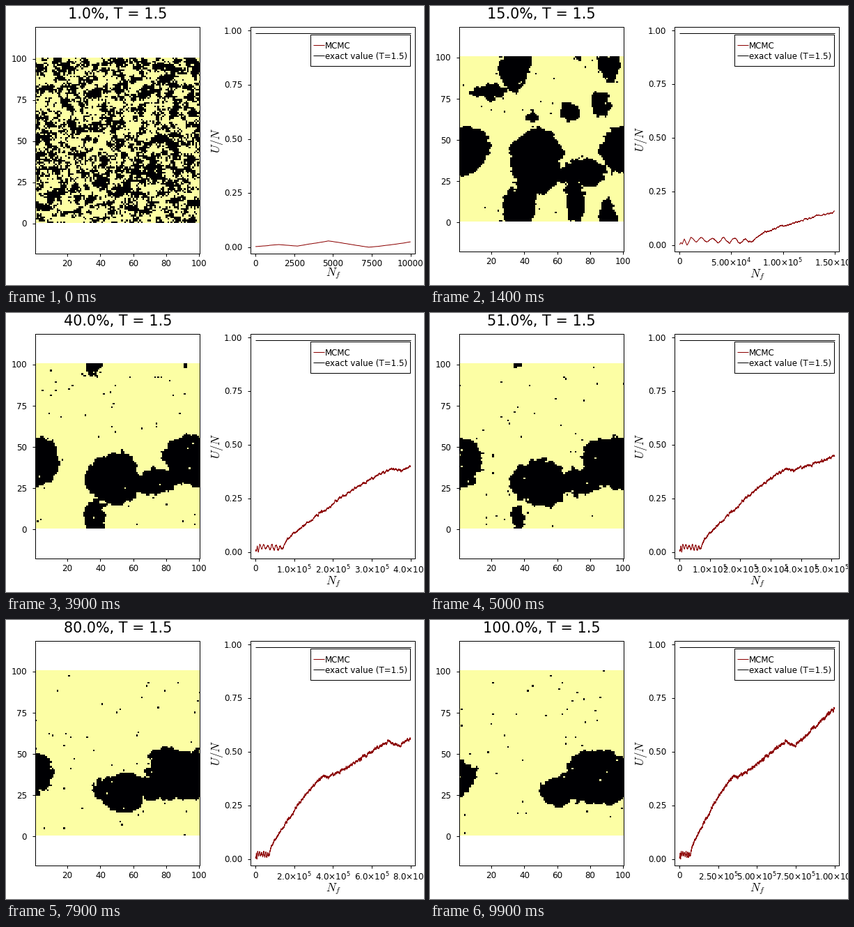
A matplotlib script that plays this animation: 600 px wide and 400 px high, repeating every 10000 ms.

```python
import numpy as np
import matplotlib.pyplot as plt
from matplotlib.animation import FuncAnimation
from matplotlib.patches import Rectangle

W, H, DPI = 600, 400, 100
PX = 72 / DPI
N = 100                 # lattice side
FRAMES = 100
SWEEP = 10_000          # spin updates per frame
FORMED = 15             # percent at which large domains have formed
T = 1.5
EXACT = (1 - np.sinh(2 / T) ** -4) ** 0.125
INK, RED = "black", "#8b0000"
TOP = 30.3
LEFT, RIGHT = (42.1, 278.4), (351.4, 587.4)
SMALL, GUIDE, TITLE = 11.86, 16.8, 20.75

plt.rcParams["font.family"] = "DejaVu Sans"
gy, gx = np.mgrid[0:N, 0:N] + 0.5


# ---------- spin lattice ----------
def smooth_noise(seed, sigma):
    """Periodic Gaussian noise with unit variance."""
    white = np.random.default_rng(seed).normal(size=(N, N))
    k = np.fft.fftfreq(N) * 2 * np.pi
    kernel = np.exp(-0.5 * sigma ** 2 * (k[:, None] ** 2 + k[None, :] ** 2))
    out = np.fft.ifft2(np.fft.fft2(white) * kernel).real
    return out / out.std()


def drifting_noise(seed, sigma, pct, period):
    """Noise that turns smoothly into a fresh pattern every period."""
    k, u = divmod(pct, period)
    a = u / period * np.pi / 2
    return (np.cos(a) * smooth_noise(seed + k, sigma)
            + np.sin(a) * smooth_noise(seed + k + 1, sigma))


def blob(cx, cy, rx, ry):
    """Rough signed distance to an ellipse on the torus, positive inside."""
    dx = (gx - cx + N / 2) % N - N / 2
    dy = (gy - cy + N / 2) % N - N / 2
    return min(rx, ry) * (1 - np.hypot(dx / rx, dy / ry))


# x, y, rx, ry of domains that shrink away, and their lifetime
FADING = [
    (36, 6, 10, 21, .55), (33, 91, 8, 12, .25), (18, 79, 11, 5, .25),
    (70, 10, 6, 14, .25), (91, 98, 7, 13, .3), (85, 71, 6, 8, .12),
    (67, 67, 6, 6, .1), (44, 63, 4, 3, .06),
]


def domains(t):
    """Positive where spins point down; t runs from 0 to 1."""
    def mix(a, b, u):
        return np.array(a) + (np.array(b) - a) * u

    parts = [blob(*mix((46, 38, 17, 19), (47, 26, 18, 14), min(2 * t, 1))
                  + mix((0, 0, 0, 0), (14, 0, -6, -6), t ** 4)),
             blob(*mix((102, 44, 17, 15), (85, 35, 24, 16), t)),
             blob(*mix((75, 30, 15, 8), (74, 27, 15, 8), t))]
    for x, y, rx, ry, life in FADING:
        if t < life:
            s = np.sqrt(1 - t / life)
            parts.append(blob(x, y, rx * s, ry * s))
    return np.max(parts, axis=0)


def spins(pct):
    field = domains(max(0, pct - FORMED) / (FRAMES - FORMED))
    field += 0.8 * drifting_noise(500, 4, pct, 40)
    field += 0.7 * drifting_noise(100, 0.9, pct, 6)
    if pct < FORMED:
        t = (pct - 1) / (FORMED - 1)
        grain = smooth_noise(7, 1.2 + 2.2 * np.sqrt(t))
        grain += 0.8 * (1 - t) ** 6 * smooth_noise(8, 0)
        w = 0.12 + 0.88 * t
        field = w * np.clip(field, -8, 8) + 8 * (1 - w) * grain
    flips = np.random.default_rng(pct).random((N, N)) < 0.0045
    return ((field < 0) ^ flips).astype(float)


# ---------- magnetisation curve ----------
TREND = [(0, .003), (.15, .013), (.27, .005), (.47, .029), (.73, .001),
         (1.1, .026), (7, .016), (8, .06), (15, .157), (25, .293),
         (34.5, .387), (38, .385), (48, .43), (60, .503), (68, .547),
         (75, .53), (85, .60), (100, .705)]


def walk(per=100, memory=30):
    s = np.arange(FRAMES * per + 1) / per
    keep = np.exp(-1 / memory)
    kicks = np.random.default_rng(3).normal(size=s.size) * np.sqrt(1 - keep ** 2)
    noise = np.zeros(s.size)
    for i in range(1, s.size):
        noise[i] = keep * noise[i - 1] + kicks[i]
    size = np.interp(s, [0, 1, 2, 8], [.0008, .0008, .002, .004])
    swing = np.interp(s, [.73, 1.1, 6, 8], [0, .01, .01, 0])
    wave = swing * np.cos(2 * np.pi * (s - 1.1) / 1.06)
    return s, np.abs(np.interp(s, *zip(*TREND)) + wave + size * noise)


sweeps, magnet = walk()


# ---------- ticks ----------
def nice_ticks(top):
    """Multiples of the best scoring round step within the padded range."""
    best, ticks = -1, None
    span = 1.06 * top
    for q, nice in [(1, 1), (5, .9), (2, .7), (2.5, .5), (3, .2)]:
        for e in range(2, 7):
            step = q * 10 ** e
            n = int(1.03 * top / step) + 1
            if not 4 <= n <= 8:
                continue
            score = ((1 - abs(n - 5) / 5) / 4 + 0.5 * span / ((n - 1) * step)
                     + nice / 4)
            if score > best - 1e-9:
                best, ticks = score, step * np.arange(n)
    return ticks


def tick_labels(ticks):
    if ticks[-1] <= 1e4:
        return [f"{v:.0f}" for v in ticks]
    exps = [int(np.log10(v) + 1e-9) for v in ticks[1:]]
    mants = [v / 10 ** e for v, e in zip(ticks[1:], exps)]
    prec = 1 if all(abs(m - round(m)) < 1e-6 for m in mants) else 2
    return ["0"] + [f"{m:.{prec}f}×10$^{{{e}}}$" for m, e in zip(mants, exps)]


# ---------- stage ----------
fig = plt.figure(figsize=(W / DPI, H / DPI), dpi=DPI, facecolor="white")
ax = fig.add_axes([0, 0, 1, 1])
image = ax.imshow(np.zeros((N, N)), cmap="inferno", vmin=0, vmax=1,
                  origin="lower", interpolation="nearest", aspect="auto")
ax.axis("off")


def label(x, y, s, size=SMALL, ha="center", va="baseline", math="dejavusans",
          **kw):
    return ax.text(x, y, s, fontsize=size * PX, ha=ha, va=va, color=INK,
                   math_fontfamily=math, **kw)


def stroke(xs, ys, color=INK, z=3):
    return ax.plot(xs, ys, color=color, lw=PX, zorder=z,
                   solid_capstyle="butt")[0]


title = label(160.3, 18.5, "", TITLE)
xguide = label(469.5, 0, "$N_f$", GUIDE, math="cm")
yguide = label(303, 0, "$U/N$", GUIDE, math="cm", rotation=90, va="center")
curve = stroke([], [], RED)
exact = stroke([], [])

ax.add_patch(Rectangle((437, 41), 143, 45, fc="white", ec=INK, lw=PX,
                       zorder=5))
for y, color, name in [(56.4, RED, "MCMC"),
                       (71.4, INK, f"exact value (T={T})")]:
    stroke([440.5, 456.5], [y, y], color, 6)
    label(458, y + 4.8, name, ha="left", zorder=6)

scratch = []


def draw_axes(box, bottom, xticks, yticks, label_x):
    x0, x1 = box
    scratch.append(stroke([x0, x1, x1, x0, x0],
                          [TOP, TOP, bottom, bottom, TOP]))
    for x, s in xticks:
        drop = 21 if "$" in s else 18
        scratch.append(stroke([x, x], [bottom, bottom + 4]))
        scratch.append(label(x, bottom + drop, s))
    for y, s in yticks:
        scratch.append(stroke([x0 - 4, x0], [y, y]))
        scratch.append(label(label_x, y + 4.3, s, ha="right"))


def draw(i):
    while scratch:
        scratch.pop().remove()
    pct = i + 1
    steps = pct * SWEEP
    ticks = nice_ticks(steps)
    names = tick_labels(ticks)
    tall = "$" in names[-1]     # exponents need a little more room
    bottom = 352 if tall else 355
    mid = (TOP + bottom) / 2
    cell = (LEFT[1] - LEFT[0]) / N

    def px(v):
        return RIGHT[0] + (v / steps + 0.03) / 1.06 * (RIGHT[1] - RIGHT[0])

    def py(v):
        return bottom - (v / EXACT + 0.03) / 1.06 * (bottom - TOP)

    title.set_text(f"{pct:.1f}%, T = {T}")
    image.set_data(spins(pct))
    image.set_extent((*LEFT, mid + N / 2 * cell, mid - N / 2 * cell))
    ax.set(xlim=(0, W), ylim=(H, 0))
    draw_axes(LEFT, bottom,
              [(LEFT[0] + (v - 0.5) * cell, str(v)) for v in range(20, 101, 20)],
              [(mid - (v - 50.5) * cell, str(v)) for v in range(0, 101, 25)],
              30)
    draw_axes(RIGHT, bottom,
              [(px(v), s) for v, s in zip(ticks, names)],
              [(py(v), f"{v:.2f}") for v in np.linspace(0, 1, 5)], 339.5)
    n = pct * 100 + 1
    curve.set_data(px(sweeps[:n] * SWEEP), py(magnet[:n]))
    exact.set_data([px(0), px(steps)], [py(EXACT)] * 2)
    xguide.set_y(389.5 if tall else 387.5)
    yguide.set_y(mid)
    return []


anim = FuncAnimation(fig, draw, frames=FRAMES, interval=100, repeat=True,
                     repeat_delay=0, blit=False)
plt.show()
```
